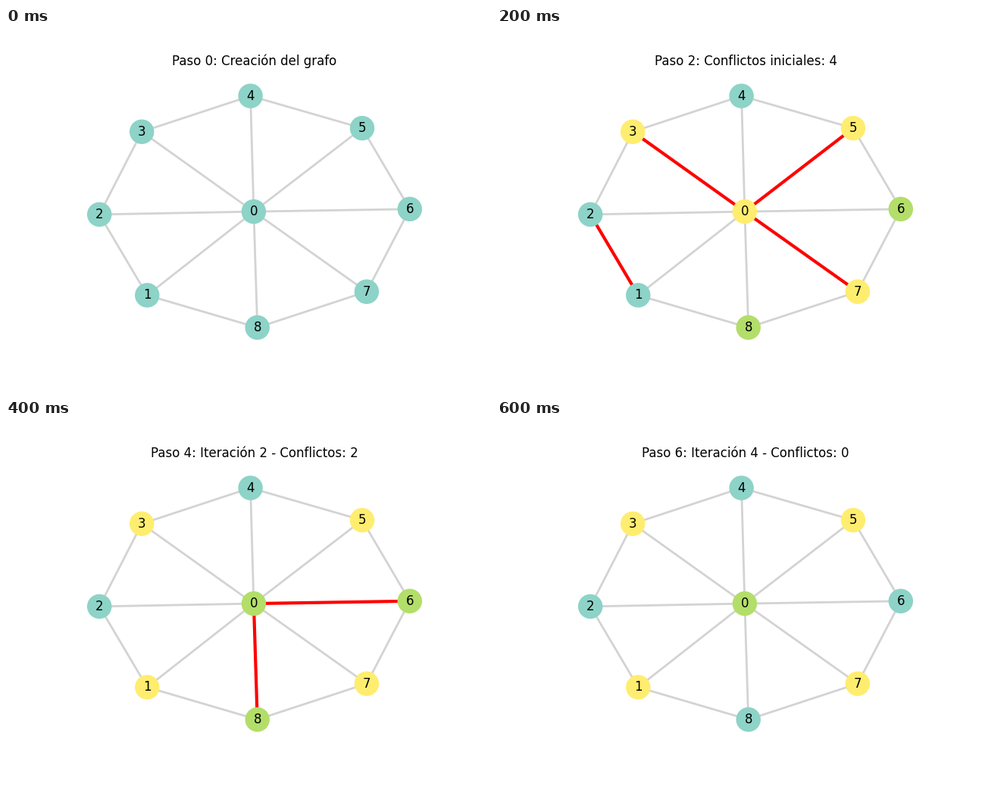
Animation of 640 by 480 pixels, one loop 700 ms. Source, as a matplotlib script:

```python
import matplotlib.pyplot as plt
from matplotlib.animation import FuncAnimation
from matplotlib.collections import LineCollection

W, H, DPI = 640, 480, 100
TEAL, GREEN, YELLOW = "#8dd3c7", "#b3de69", "#ffed6f"

# Node centres in pixels, hub first
POS = [(326.9, 242.1), (186.3, 352.4), (123.2, 245.9), (179.2, 136.8),
       (322.6, 89.6), (470.0, 132.1), (532.8, 238.8), (475.9, 347.7),
       (331.7, 395.0)]
RIM = range(1, 9)
EDGES = [(0, n) for n in RIM] + [(n, n % 8 + 1) for n in RIM]

START = [YELLOW, TEAL, TEAL, YELLOW, TEAL, YELLOW, GREEN, YELLOW, GREEN]
FIXES = [(0, GREEN), (1, YELLOW), (6, TEAL), (8, TEAL)]
STEPS = 3 + len(FIXES)


def colors_at(step):
    if step == 0:
        return [TEAL] * len(POS)
    colors = START[:]
    for node, color in FIXES[:max(step - 2, 0)]:
        colors[node] = color
    return colors


def conflicts_at(step):
    if step == 0:
        return []
    c = colors_at(step)
    return [(a, b) for a, b in EDGES if c[a] == c[b]]


def title_at(step):
    count = len(conflicts_at(step))
    if step == 0:
        text = "Creación del grafo"
    elif step == 1:
        text = "Asignación aleatoria de colores"
    elif step == 2:
        text = f"Conflictos iniciales: {count}"
    else:
        text = f"Iteración {step - 2} - Conflictos: {count}"
    return f"Paso {step}: {text}"


def segments(edges):
    return [(POS[a], POS[b]) for a, b in edges]


plt.rcParams["font.family"] = "DejaVu Sans"
fig = plt.figure(figsize=(W / DPI, H / DPI), dpi=DPI, facecolor="white")
ax = fig.add_axes([0.125, 0.11, 0.775, 0.77])
# Data units equal stage pixels, y pointing down
ax.set_xlim(0.125 * W, 0.9 * W)
ax.set_ylim(0.89 * H, 0.12 * H)
ax.axis("off")

ax.add_collection(LineCollection(segments(EDGES), colors="lightgray",
                                 linewidths=2, zorder=1), autolim=False)
clashes = LineCollection([], colors="red", linewidths=3, zorder=1.5)
ax.add_collection(clashes, autolim=False)
nodes = ax.scatter(*zip(*POS), s=500, c=colors_at(0), linewidths=1, zorder=2)
for i, (x, y) in enumerate(POS):
    ax.text(x, y, str(i), size=12, ha="center", va="center", zorder=3)
title = ax.set_title(title_at(0), fontsize=12)


def draw(step):
    colors = colors_at(step)
    nodes.set_facecolor(colors)
    nodes.set_edgecolor(colors)
    clashes.set_segments(segments(conflicts_at(step)))
    title.set_text(title_at(step))
    return nodes, clashes, title


anim = FuncAnimation(fig, draw, frames=STEPS, interval=100, repeat=True,
                     repeat_delay=0, blit=False)
plt.show()
```
